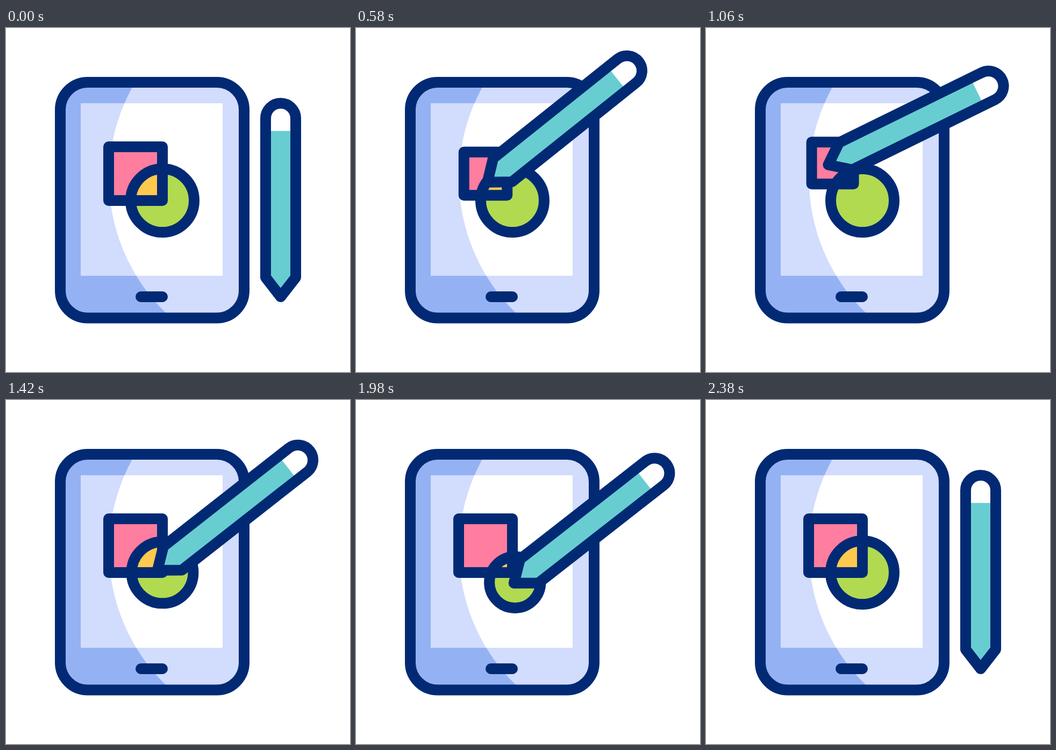
An HTML page for the animation above (2.4 s loop, 640 by 640 pixels).

```html
<!DOCTYPE html>
<html lang="en">
<head>
<meta charset="utf-8">
<title>Drawing tablet</title>
<style>
  html, body { margin: 0; width: 100%; height: 100%; overflow: hidden; background: #fff; }
  svg { display: block; width: 100%; height: 100%; }
  .line { fill: none; stroke: #022a74; stroke-width: 20; stroke-linecap: round; stroke-linejoin: round; }
</style>
</head>
<body>
<svg viewBox="0 0 640 640">
  <defs>
    <clipPath id="body"><rect x="101" y="101" width="342" height="438.5" rx="51"/></clipPath>
    <clipPath id="screen"><rect x="139" y="140" width="264" height="321"/></clipPath>
    <clipPath id="inSquare"><rect class="square"/></clipPath>
    <path id="penShape" d="M-28 144V-152A28 28 0 0 1 28 -152V144L0 180Z"/>
  </defs>

  <g clip-path="url(#body)">
    <rect x="91" y="91" width="362" height="459" fill="#94b2f3"/>
    <circle cx="541.5" cy="279.3" r="350" fill="#d2dcfd"/>
  </g>
  <g clip-path="url(#screen)">
    <rect x="139" y="140" width="264" height="321" fill="#d2dcfd"/>
    <circle cx="541.5" cy="279.3" r="350" fill="#fff"/>
  </g>
  <rect class="line" x="101" y="101" width="342" height="438.5" rx="51"/>
  <path class="line" d="M251 500H291"/>

  <rect class="square" fill="#ff7d9f"/>
  <circle class="disc" fill="#b1da51"/>
  <g clip-path="url(#inSquare)"><circle class="disc" fill="#ffc94d"/></g>
  <rect class="square line"/>
  <circle class="disc line"/>

  <!-- pen, centred on its own origin -->
  <g id="pen">
    <use href="#penShape" fill="#fff"/>
    <path d="M-28 144V-128.500H28V144L0 180Z" fill="#68cdd1"/>
    <use href="#penShape" class="line"/>
  </g>
</svg>
<script>
  const LOOP = 2400;

  // pen poses: x, y, turn in degrees
  const HOME = [511, 320, 0];
  const ON_SQUARE = [385.2, 174.5, 51.4];
  const ON_DISC = [430.9, 211.6, 52];

  // offsets at the far end of each drag
  const PEN_TILT = [8.7, 1.3, 28.2];
  const SQUARE_DRAG = [-12.3, -45];
  const DISC_DRAG = [16.4, 63];

  // eased 0..1 between two times
  function ramp(t, from, to) {
    const u = Math.min(1, Math.max(0, (t - from) / (to - from)));
    return u * u * (3 - 2 * u);
  }

  // out to 1 and back to 0
  const swing = (t, out, peak, back) => ramp(t, out, peak) - ramp(t, peak, back);

  // shape shrinks under the pen, then grows back
  const press = (t, down, up) => 1 - 0.22 * (ramp(t, down, down + 140) - ramp(t, up, up + 140));

  const mix = (a, b, u) => a.map((v, i) => v + (b[i] - v) * u);
  const add = (a, b, k) => a.map((v, i) => v + (b[i] || 0) * k);

  function setAll(list, attrs) {
    for (const el of list)
      for (const name in attrs) el.setAttribute(name, attrs[name]);
  }

  const pen = document.getElementById('pen');
  const squares = document.querySelectorAll('.square');
  const discs = document.querySelectorAll('.disc');

  function draw(t) {
    const pullSquare = swing(t, 590, 910, 1190);
    const pullDisc = swing(t, 1490, 1820, 2070);

    let pose = mix(HOME, ON_SQUARE, ramp(t, 200, 580));
    pose = mix(pose, ON_DISC, ramp(t, 1220, 1490));
    pose = mix(pose, HOME, ramp(t, 2070, 2380));
    pose = add(add(pose, PEN_TILT, pullSquare), DISC_DRAG, pullDisc);
    pen.setAttribute('transform', `translate(${pose[0]} ${pose[1]}) rotate(${pose[2]})`);

    const [sx, sy] = add([241, 271], SQUARE_DRAG, pullSquare);
    const half = 50 * press(t, 470, 1070);
    setAll(squares, { x: sx - half, y: sy - half, width: 2 * half, height: 2 * half });

    const [cx, cy] = add([291, 321], DISC_DRAG, pullDisc);
    setAll(discs, { cx, cy, r: 59 * press(t, 1390, 1950) });
  }

  const start = performance.now();
  function tick(now) {
    draw(Math.max(0, now - start) % LOOP);
    requestAnimationFrame(tick);
  }
  draw(0);
  requestAnimationFrame(tick);
</script>
</body>
</html>
```
